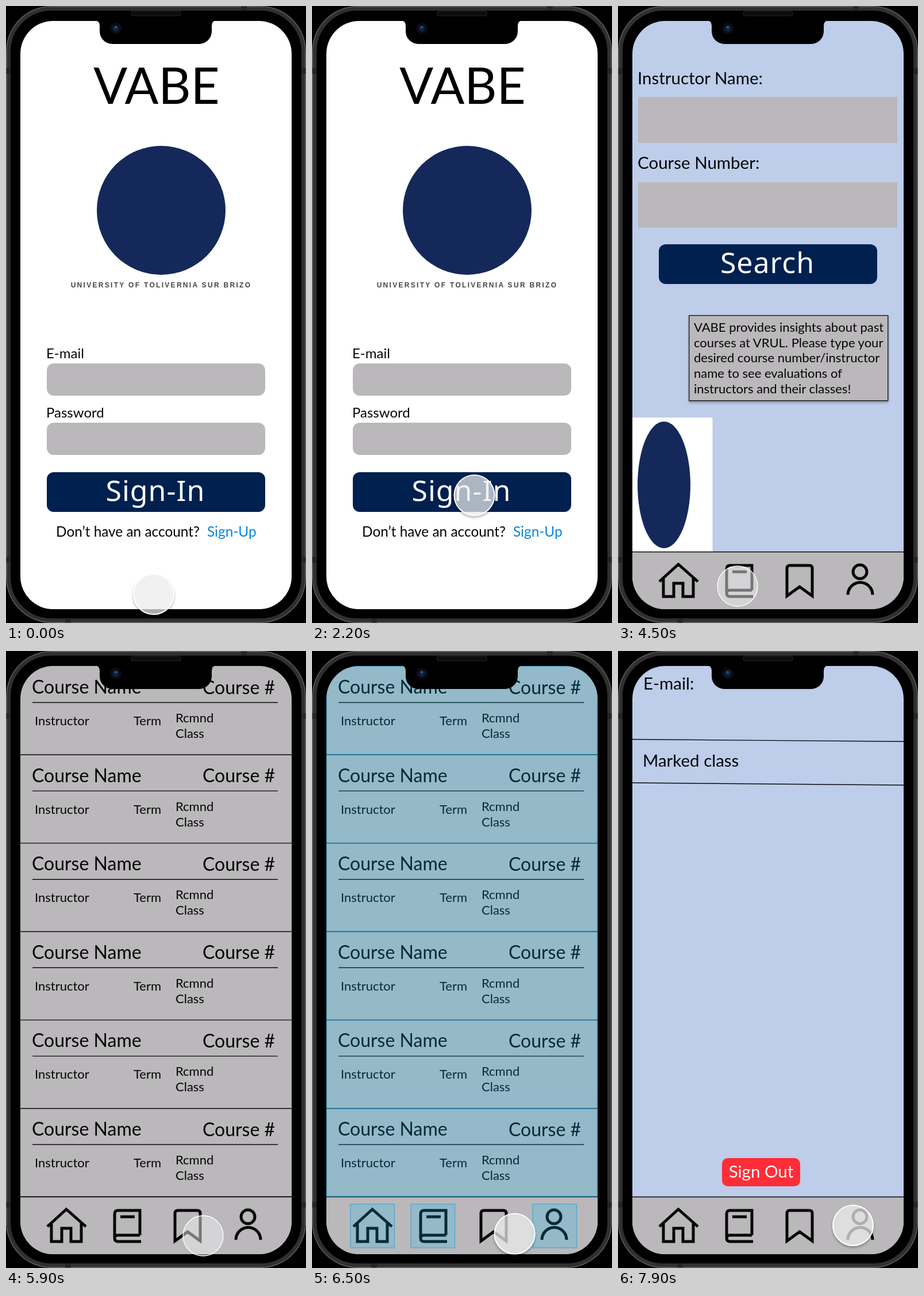
An HTML page that plays this animation: 522 px wide and 1072 px high, repeating every 8000 ms.

```html
<!DOCTYPE html>
<html lang="en">
<head>
<meta charset="utf-8">
<title>Course app prototype</title>
<style>
  html, body { margin: 0; height: 100%; overflow: hidden; background: #000; }
  svg { display: block; width: 100vw; height: 100vh; }
  text { font-family: Lato, "Open Sans", sans-serif; white-space: pre; }
  .button { font: 50px "Noto Sans", sans-serif; letter-spacing: 1px; fill: #fff; text-anchor: middle; }
  .caption { font: bold 12px "Liberation Sans", Arial, sans-serif; letter-spacing: 2.3px; fill: #444; text-anchor: middle; }
  .line { stroke: #0b0b0b; stroke-width: 1.4; }
  .icon { fill: none; stroke: #060606; stroke-width: 5; }
  .hint { fill: #00bdff; fill-opacity: .31; stroke: #1c9fe0; stroke-width: 1.5; stroke-opacity: .85; }
</style>
</head>
<body>
<svg viewBox="0 0 522 1072" preserveAspectRatio="none">
  <defs>
    <clipPath id="glass"><rect x="25" y="26" width="472" height="1022" rx="57"/></clipPath>
    <filter id="shadow" x="-20%" y="-20%" width="140%" height="150%">
      <feDropShadow dx="0" dy="3" stdDeviation="2" flood-opacity=".28"/>
    </filter>
    <!-- only the part of the shadow outside the shape -->
    <filter id="outer" x="-20%" y="-20%" width="140%" height="150%">
      <feGaussianBlur in="SourceAlpha" stdDeviation="2"/>
      <feOffset dy="3"/>
      <feComposite operator="out" in2="SourceAlpha"/>
    </filter>
  </defs>

  <rect width="522" height="1072"/>
  <g fill="none">
    <rect x="1" y="1" width="520" height="1070" rx="78" stroke="#5a5855" stroke-width="2"/>
    <rect x="5" y="5" width="512" height="1062" rx="74" stroke="#32302e" stroke-width="6"/>
    <path d="M1 113H8M514 113H521M1 962H8M514 962H521M414 1V8M108 1064V1071" stroke="#262523" stroke-width="10"/>
  </g>

  <g id="screens" clip-path="url(#glass)"></g>

  <path d="M155 25Q163 26 163 34V44A22 22 0 0 0 185 66H336A22 22 0 0 0 358 44V34Q358 26 366 25Z"/>
  <rect x="218" y="9" width="86" height="8" rx="3" fill="#0c0c0d" stroke="#2a292b"/>
  <circle cx="191" cy="39" r="10" fill="#0a0d15"/>
  <circle cx="191" cy="39" r="5.5" fill="#10223f"/>
  <circle cx="191" cy="37" r="2" fill="#2d5c92"/>

  <g id="cursor">
    <circle id="halo" r="36" opacity=".28" filter="url(#outer)"/>
    <circle id="disc" r="35" stroke="#fff"/>
  </g>
</svg>
<script>
const $ = id => document.getElementById(id);
const NAVY = '#00204f', GREY = '#bab8ba', BLUE = '#bdcdea';

const text = (x, y, size, str, fill = '#060606', extra = '') =>
  `<text x="${x}" y="${y}" font-size="${size}" fill="${fill}" ${extra}>${str}</text>`;
const box = (x, y, w, h, fill, rx = 0, extra = '') =>
  `<rect x="${x}" y="${y}" width="${w}" height="${h}" rx="${rx}" fill="${fill}" ${extra}/>`;
const line = (x1, y1, x2, y2) => `<path class="line" d="M${x1} ${y1}L${x2} ${y2}"/>`;
const button = (y, label) =>
  box(71, y, 380, 69, NAVY, 12) + `<text class="button" x="260" y="${y + 49.5}">${label}</text>`;
const backdrop = fill => box(25, 26, 472, 1022, fill);

const nav = box(25, 949, 472, 99, GREY) + line(25, 948.5, 497, 948.5) + `<path class="icon" d="
  M72 1000L105 970L139 1000M79 994V1026H97V1003H113V1026H131V994
  M233 1015V972H195Q189 972 189 978V1020Q189 1026 195 1026H235M189 1020Q189 1015 195 1015H233M199 983H224
  M294 1025V977Q294 972 299 972H333Q338 972 338 977V1025L316 1009Z
  M409 983a12 12 0 0 1 24 0a12 12 0 0 1 -24 0M400 1023a21.5 21.5 0 0 1 43 0"/>`;

const signIn = backdrop('#fff')
  + text(262, 170, 87, 'VABE', '#000', 'text-anchor="middle"')
  + `<circle cx="270" cy="355" r="112" fill="#14295a"/>`
  + '<text class="caption" x="270" y="489">UNIVERSITY OF TOLIVERNIA SUR BRIZO</text>'
  + text(70, 612, 24, 'E-mail') + box(71, 621, 380, 56, GREY, 12)
  + text(70, 715, 24, 'Password') + box(71, 724, 380, 56, GREY, 12)
  + button(810, 'Sign-In')
  + text(87, 922, 24.4, 'Don’t have an account?') + text(350, 922, 24.4, 'Sign-Up', '#0a86dc');

const intro = ['VABE provides insights about past', 'courses at VRUL. Please type your',
  'desired course number/instructor', 'name to see evaluations of', 'instructors and their classes!'];
const search = backdrop(BLUE)
  + text(34, 136, 29.5, 'Instructor Name:') + box(35, 158, 451, 80, GREY)
  + text(34, 283, 29.5, 'Course Number:') + box(35, 306, 451, 79, GREY)
  + button(414, 'Search')
  + box(123.7, 537.7, 346, 148, GREY, 0, 'stroke="#111" stroke-width="1.3" filter="url(#shadow)"')
  + intro.map((s, i) => text(132, 566 + i * 26.7, 22, s)).join('')
  + box(25, 715, 139.5, 234, '#fff') + `<ellipse cx="80" cy="832" rx="46" ry="110" fill="#14295a"/>`
  + nav;

const PITCH = 153.6;
const rows = f => Array.from({length: 6}, (_, i) => f(i * PITCH)).join('');
const courses = backdrop(GREY) + nav
  + rows(y => text(45, 74 + y, 32, 'Course Name') + text(342, 74.5 + y, 32, 'Course #')
    + line(46, 89.5 + y, 473, 89.5 + y)
    + text(50, 129 + y, 22, 'Instructor') + text(222, 129 + y, 22, 'Term')
    + text(295, 124 + y, 22, 'Rcmnd') + text(295, 151 + y, 22, 'Class')
    + line(25, 180.3 + y, 497, 180.3 + y))
  + '<g id="hints">' + rows(y => `<rect class="hint" x="25.5" y="${26.7 + y}" width="470.5" height="${PITCH}"/>`)
  + [67, 172, 384].map(x => `<rect class="hint" x="${x}" y="961" width="76.5" height="76"/>`).join('') + '</g>';

const profile = backdrop(BLUE)
  + text(44, 67, 29.5, 'E-mail:') + line(25, 153.5, 497, 157.3)
  + text(43, 201, 29.5, 'Marked class') + line(25, 229, 497, 233)
  + box(181, 881, 136, 49, '#ff2d37', 10) + text(249, 915, 29.5, 'Sign Out', '#fff', 'text-anchor="middle"')
  + nav;

$('screens').innerHTML = [signIn, search, courses, profile].map(s => `<g>${s}</g>`).join('');
const screens = [...$('screens').children];

const starts = [0, 2900, 4700, 7300];
const presses = [[2600, 2900], [4400, 4700], [5800, 6100], [7100, 7300]];
const path = [[0, 257, 1022], [1100, 282.5, 850], [3500, 282.5, 850], [4300, 208, 1008],
  [4700, 208, 1008], [5100, 291.5, 1022], [5400, 291.5, 1022], [5800, 343, 1016],
  [6400, 343, 1016], [6800, 404.5, 994], [7000, 404.5, 994], [7300, 409, 998], [8000, 409, 998]];

const clamp = v => Math.min(1, Math.max(0, v));
const ease = v => v * v * (3 - 2 * v);

function cursorAt(t) {
  const i = path.findIndex(p => p[0] > t);
  const [t0, x0, y0] = path[i - 1], [t1, x1, y1] = path[i];
  const k = ease((t - t0) / (t1 - t0));
  return [x0 + (x1 - x0) * k, y0 + (y1 - y0) * k];
}

function draw(now) {
  const t = Math.floor(now % 8000 / 100) * 100;
  const current = starts.filter(s => s <= t).length - 1;
  screens.forEach((s, i) => s.style.display = i === current ? '' : 'none');
  $('hints').style.opacity = clamp((t - 6000) / 200) * clamp((6700 - t) / 300);

  const pressed = presses.some(([a, b]) => t >= a && t < b);
  $('cursor').setAttribute('transform', `translate(${cursorAt(t)})`);
  $('halo').style.display = pressed ? 'none' : '';
  $('disc').setAttribute('fill', pressed ? 'rgba(240,240,242,.48)' : 'rgba(236,236,238,.73)');
  $('disc').setAttribute('stroke-width', pressed ? 1.3 : 2);
  requestAnimationFrame(draw);
}
requestAnimationFrame(draw);
</script>
</body>
</html>
```
